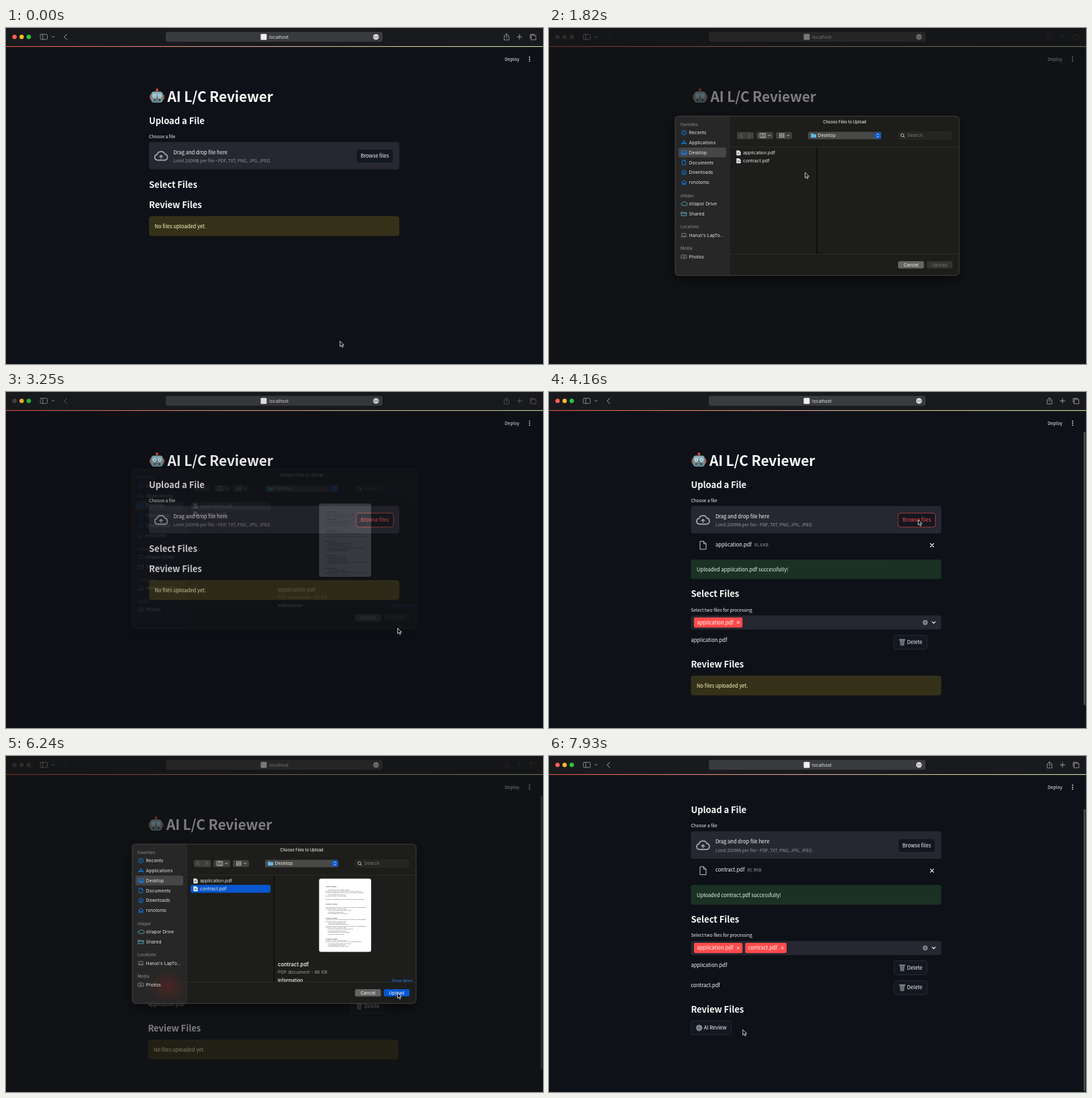
Animation of 800 by 500 pixels, one loop 8000 ms. Source, as an HTML page:

```html
<!DOCTYPE html>
<html lang="en">
<head>
<meta charset="utf-8">
<title>File review app</title>
<style>
html, body { margin: 0; width: 100%; height: 100%; overflow: hidden; background: #0e1117; }
svg { display: block; width: 100%; height: 100%; }
text { white-space: pre; }
.h1, .h2, .body, .small { font-family: "Noto Sans CJK JP", "Noto Sans CJK SC", "Noto Sans CJK", "Noto Sans", sans-serif; }
.h1 { font-size: 20.88px; font-weight: 700; letter-spacing: -.005em; }
.h2 { font-size: 13.1px; font-weight: 700; letter-spacing: -.005em; }
.body { font-size: 7.59px; }
.small { font-size: 6.64px; }
.dot { font-family: "Noto Sans", sans-serif; font-size: 5.9px; }
.ui, .tiny, .head, .name, .info { font-family: Inter, Roboto, sans-serif; }
.ui { font-size: 6.8px; }
.tiny { font-size: 5.85px; }
.head { font-size: 5.8px; font-weight: 600; }
.name { font-size: 7.7px; font-weight: 600; }
.info { font-size: 6.7px; font-weight: 600; }
.doc { font-family: "Liberation Sans", sans-serif; font-size: 2.05px; }
.mid { text-anchor: middle; }
</style>
</head>
<body>
<svg id="stage" viewBox="0 0 800 500" preserveAspectRatio="none"></svg>
<script>
const BG = '#0e1117', WHITE = '#fafafa', BLUE = '#0a84ff', TEAL = '#5fb6bd', GRAY = '#98989a', ACCENT = '#0757d0';

const text = (x, y, s, cls, fill = WHITE, extra = '') =>
  `<text x="${x}" y="${y}" class="${cls}" fill="${fill}" ${extra}>${s}</text>`;
const rect = (x, y, w, h, fill, r = 0, extra = '') =>
  `<rect x="${x}" y="${y}" width="${w}" height="${h}" rx="${r}" fill="${fill}" ${extra}/>`;
const circle = (x, y, r, fill, extra = '') =>
  `<circle cx="${x}" cy="${y}" r="${r}" fill="${fill}" ${extra}/>`;
const line = (d, color, w = 1, extra = '') =>
  `<path d="${d}" fill="none" stroke="${color}" stroke-width="${w}" stroke-linecap="round" stroke-linejoin="round" ${extra}/>`;
const group = (id, s, extra = '') => `<g id="${id}" ${extra}>${s}</g>`;
const cross = (x, y, r, color, w) =>
  line(`M${x - r} ${y - r}l${2 * r} ${2 * r}m0 ${-2 * r}l${-2 * r} ${2 * r}`, color, w);
const chevron = (x, y, r, color, w = 1) => line(`M${x - r} ${y - r / 2}l${r} ${r}l${r} ${-r}`, color, w);

// Page parts
const button = (x, y, w, id = '') =>
  rect(x, y, w, 20.8, '#131720', 4, `stroke="#363a43" stroke-width=".6" ${id && `id="${id}"`}`);
const panel = (y, h, fill) => rect(213, y, 373, h, fill, 4);

const robot = () =>
  line('M225 95v-3', '#8a6a50', 1.4) + circle(225, 92, 1.9, '#e8472f') +
  rect(214, 99, 22, 7.5, '#b4552e', 2) +
  rect(216, 94.5, 18, 16.5, '#6f929d', 4.5) + rect(217.5, 95.5, 15, 5, '#8fb0b8', 3) +
  circle(221, 101.3, 2.5, '#d7f3f6') + circle(229, 101.3, 2.5, '#d7f3f6') +
  circle(221, 101.3, 1.2, '#3c93ad') + circle(229, 101.3, 1.2, '#3c93ad') +
  `<path d="M225 102l1.4 2.8h-2.8z" fill="#d2502f"/>` +
  rect(219.8, 106, 10.4, 2.8, '#27363d', 1) +
  line('M222 107.4h6', '#d9e4e5', 1, 'stroke-dasharray="1 1.2" stroke-linecap="butt"');

const cloud = () =>
  line('M226.5 196.6h-.8a4.3 4.3 0 0 1-.6-8.5a6.2 6.2 0 0 1 11.6-.5a4.6 4.6 0 0 1 .3 9h-1.6', '#a3a8b4', 1.7) +
  line('M227 196.6h8', '#a3a8b4', 1.7) +
  line('M231 194v-4.4m-2.2 2l2.2-2.2l2.2 2.2', '#a3a8b4', 1.4);

const top_ = () =>
  robot() + text(240.5, 110, 'AI L/C Reviewer', 'h1') +
  text(213, 142.9, 'Upload a File', 'h2') + text(213, 163.6, 'Choose a file', 'small') +
  panel(169.5, 41, '#262730') + cloud() +
  text(249.5, 187.6, 'Drag and drop file here', 'body') +
  text(249.5, 200.4, 'Limit 200MB per file <tspan class="dot">•</tspan> PDF, TXT, PNG, JPG, JPEG', 'small', '#92939a') +
  button(521.6, 180.2, 55.6, 'browse') + text(549.4, 193.2, 'Browse files', 'body mid', WHITE, 'id="browseText"');

const warning = y => panel(y, 29.4, '#353119') + text(221.6, y + 18, 'No files uploaded yet.', 'body', '#ffffc2');
const headings = (a, b) => text(213, a, 'Select Files', 'h2') + text(213, b, 'Review Files', 'h2');

const trash = (x, y) =>
  `<path d="M${x - 4} ${y - 3.6}h8l-1.2 8.6h-5.6z" fill="#5c6166"/>` +
  rect(x - 4.7, y - 4.8, 9.4, 1.6, '#8b9095', .8) +
  line(`M${x - 1.8} ${y - 2}l.4 6m3.2-6l-.4 6`, '#9aa0a5', .5);
const gear = (x, y) =>
  circle(x, y, 4, 'none', 'stroke="#a9b0b6" stroke-width="1.6" stroke-dasharray="1.5 1"') +
  circle(x, y, 2.8, '#3a4048', 'stroke="#8f979e" stroke-width="1.5"') + circle(x, y, 1, '#a9b0b6');

const tag = (x, w, name) =>
  rect(x, 335.4, w, 15.2, '#ff4b4b', 2) + text(x + 4.6, 345.8, name, 'body') + cross(x + w - 6.3, 343, 1.6, WHITE, .9);
const fileRow = (y, name) =>
  text(213, y, name, 'body') + button(515.6, y - 9.5, 49.2) + trash(527.8, y + 1) + text(535.2, y + 3.6, 'Delete', 'body');

const uploaded = (name, size, sizeX) =>
  line('M227 222.2h5l3.6 3.6v8.2h-8.6zM232 222.2v3.6h3.6', '#c4c6cc', 1) +
  text(249.6, 229.8, name, 'body') + text(sizeX, 229.8, size, 'small', '#92939a') +
  cross(572.2, 228, 2.5, WHITE, 1.1) +
  panel(249.2, 29.4, '#1a3123') + text(221.6, 267.2, `Uploaded ${name} successfully!`, 'body', '#dffde9') +
  text(213, 326.6, 'Select two files for processing', 'small') +
  panel(332.6, 21, '#262730') + tag(217.6, 72.2, 'application.pdf') +
  circle(562.1, 343, 3.7, '#85868c') + cross(562.1, 343, 1.2, '#262730', .8) + chevron(574.8, 343, 2.3, WHITE, 1.2) +
  fileRow(371.6, 'application.pdf');

const page =
  top_() +
  group('empty', headings(237.8, 268.1) + warning(280)) +
  group('one', uploaded('application.pdf', '91.6KB', 307) + headings(305.3, 409.8) + warning(422)) +
  group('two', uploaded('contract.pdf', '85.9KB', 296.8) + tag(293.8, 61.8, 'contract.pdf') +
    fileRow(401.3, 'contract.pdf') + headings(305.3, 439.4) +
    button(213.2, 451.4, 59.8) + gear(225.3, 462) + text(232.4, 464.6, 'AI Review', 'body'));

// Browser chrome
const lights = ['#ff5f57', '#febc2e', '#28c840'];
const chrome =
  rect(0, 28, 800, 32, BG) +
  text(743, 48.8, 'Deploy', 'small') + [43.3, 46.3, 49.3].map(y => circle(780, y, .9, WHITE)).join('') +
  rect(796.6, 59, 2.6, 400, '#4d4f55', 1.3, 'id="thumb"') +
  rect(0, 0, 800, 27, '#191a1d') + rect(0, 27, 800, 1.1, 'url(#bar)') +
  lights.map((c, i) => circle(12.7 + i * 10.6, 13.3, 3.2, c, 'class="light"')).join('') +
  line('M52.3 9.4h8a1.2 1.2 0 0 1 1.2 1.2v5.2a1.2 1.2 0 0 1-1.2 1.2h-8a1.2 1.2 0 0 1-1.2-1.2v-5.2a1.2 1.2 0 0 1 1.2-1.2zM54.8 9.4v7.6', '#9c9da0', .8) +
  chevron(70.3, 13.2, 1.6, '#9c9da0', 1) +
  rect(238, 5.8, 323, 14.8, '#3a3b3e', 3.5) + rect(379.4, 8.8, 9, 9, '#f0f0f0', 1.5) +
  text(392, 15.7, 'localhost', 'ui', '#e4e4e5') +
  circle(551.2, 13.3, 4.3, '#d6d6d8') + [549, 551.2, 553.4].map(x => circle(x, 13.3, .65, '#3a3b3e')).join('') +
  group('tools',
    line('M90.6 9.4l-4 3.9l4 3.9', '#a9aaad', 1) +
    line('M743.6 11.8h-1.4v6h7v-6h-1.4M745.7 14.6v-6m-2 1.8l2-2l2 2', '#a9aaad', .8) +
    line('M761.5 13.2h7m-3.5-3.5v7', '#a9aaad', .9) +
    line('M782.7 11h6.6v6.6h-6.6zM781 15.6v-6.2h6.4', '#a9aaad', .8));

// Upload dialog
const icons = {
  clock: y => circle(201, y, 3.4, 'none', `stroke="${BLUE}" stroke-width=".8"`) + line(`M201 ${y - 2}v2h-1.6`, BLUE, .7),
  apps: y => line(`M198 ${y + 2.8}l3-5.8l3 5.8M197.6 ${y + 1}h2m3 0h2M200.2 ${y + 1}h1.6`, BLUE, 1),
  desk: y => rect(197.2, y - 2.8, 7.8, 5.6, 'none', 1, `stroke="${BLUE}" stroke-width=".9"`) + rect(198, y + .6, 6.2, 1.6, BLUE),
  doc: y => line(`M198.6 ${y - 3.5}h3l2 2v5h-5zM201.6 ${y - 3.5}v2h2`, BLUE, .8),
  down: y => circle(201, y, 3.4, 'none', `stroke="${BLUE}" stroke-width=".8"`) + line(`M201 ${y - 1.7}v3.2m-1.4-1.3l1.4 1.4l1.4-1.4`, BLUE, .7),
  home: y => line(`M197.4 ${y}l3.6-3.2l3.6 3.2M198.5 ${y}v3.2h1.6v-2h1.8v2h1.6v-3.2`, BLUE, .9),
  cloud: y => line(`M199 ${y + 2.5}a1.9 1.9 0 0 1 0-3.8a2.7 2.7 0 0 1 5-.4a2.1 2.1 0 0 1 .2 4.2z`, TEAL, .8),
  share: y => line(`M197.3 ${y - 2.5}h2.6l.8.9h4.2v4.4h-7.6zM197.3 ${y - .5}h7.6`, TEAL, .8),
  laptop: y => line(`M198.2 ${y - 2.5}h5.6v4h-5.6zM196.9 ${y + 2.6}h8.2`, GRAY, .7),
  camera: y => line(`M197.2 ${y - 1.9}h2l.7-1h2.2l.7 1h2v4.7h-7.6z`, GRAY, .7) + circle(201, y + .4, 1.3, 'none', `stroke="${GRAY}" stroke-width=".7"`)
};
const places = [
  [155.7, 'clock', 'Recents'], [170.5, 'apps', 'Applications'], [185.3, 'desk', 'Desktop'],
  [200.1, 'doc', 'Documents'], [215, 'down', 'Downloads'], [229.8, 'home', 'rvnolomo'],
  [261.6, 'cloud', 'oVapor Drive'], [276.4, 'share', 'Shared'],
  [308.3, 'laptop', 'Haruo\'s LapTo...'], [340.1, 'camera', 'Photos']
];
const sections = [[145.8, 'Favorites'], [252, 'oVapor'], [298.4, 'Locations'], [330.3, 'Media']];

const files = ['application.pdf', 'contract.pdf'];
const sizes = ['92 KB', '86 KB'];
const phrases = [
  'This agreement sets out the terms for the supply of goods between',
  'the parties named above and is valid from the date of signature',
  'Goods are packed and shipped under the terms listed here',
  'Payment by letter of credit at sight'
];
const plans = ['# pp #--pp  #pp p  #---p--  #p--pp  #--p-', '# -pp-p p  # pp---  #pp--pp----  #pp---'];
const preview = i => group('preview' + i,
  rect(466.4, 182.4, 77.6, 109, '#fff', 3) +
  [...plans[i]].map((c, n) => {
    const y = +(195 + n * 2.35).toFixed(2), s = phrases[(n * 3 + i) % 4];
    return c === '#' ? text(476, y, `${n ? 1 + n / 9 | 0 : ''} Terms of Supply`, 'doc', '#111', 'font-weight="700"')
      : c === 'p' ? text(476, y, s, 'doc', '#333')
      : c === '-' ? text(479, y, '• ' + s.slice(0, 24 + n * 7 % 16), 'doc', '#222') : '';
  }).join('') +
  text(405, 313.2, files[i], 'name', '#e4e4e2') +
  text(405, 324, `PDF document - ${sizes[i]}`, 'ui', '#9b9b99') +
  `<g clip-path="url(#fold)">${text(405, 336.4, 'Information', 'info', '#e4e4e2')}${text(574.5, 336.6, 'Show More', 'tiny', '#2b80ee')}</g>`);

const fileItem = i => {
  const y = 185.8 + i * 11.8;
  return rect(275, y - 5.8, 119, 11.6, ACCENT, 2.5, `id="sel${i}"`) +
    `<path d="M279.3 ${y - 3.6}h4l2.3 2.3v5h-6.3z" fill="#f4f4f4"/>` +
    rect(280.7, y - .6, 3.4, 2.4, '#8d9094') +
    text(289, y + 2.4, files[i], 'ui', '#e8e8e6');
};
const tool = (x, w) => rect(x, 154.8, w, 10.4, '#40403e', 2.5);

const dialog =
  rect(188, 131.2, 423, 237, '#1d1d1b', 5, 'style="filter:drop-shadow(0 6px 10px rgba(0,0,0,.5))"') +
  `<path d="M270 131.2v237h-77a5 5 0 0 1-5-5v-227a5 5 0 0 1 5-5z" fill="#262726"/>` +
  `<ellipse id="tint" cx="241" cy="343" rx="29" ry="24" fill="url(#glow)"/>` +
  line('M270 177.4H611M270 336.6H611', '#30302e', .7) + line('M399.3 178V336', '#070707', 1.2) +
  rect(188, 131.2, 423, 237, 'none', 5, 'stroke="#555654" stroke-width=".7"') +
  rect(193, 178, 71, 14.6, '#454645', 3) +
  sections.map(([y, s]) => text(196, y, s, 'head', '#777876')).join('') +
  places.map(([y, icon, s]) => icons[icon](y) + text(208.6, y + 2.4, s, 'ui', '#e6e6e4')).join('') +
  text(440.5, 142.1, 'Choose Files to Upload', 'tiny mid', '#e2e2e0', 'font-weight="500"') +
  tool(280, 25) + line('M292.5 156v8', '#2a2a28', .6) +
  line('M287.4 157.5l-2.4 2.5l2.4 2.5M297.8 157.5l2.4 2.5l-2.4 2.5', '#777775', .9) +
  tool(309.4, 24.6) + line('M314.6 157h8v6h-8zM317.3 157v6m2.7-6v6', '#dededc', .7) + chevron(328.3, 160, 1.6, '#dededc', .9) +
  tool(338, 24) + [0, 1, 2].map(c => [0, 1, 2].map(r => rect(343 + c * 2.8, 156.8 + r * 2.4, 2, 1.5, '#c8c8c6')).join('')).join('') +
  chevron(356.3, 160, 1.6, '#dededc', .9) +
  rect(386, 154.6, 109, 10.8, '#4a4a48', 2.5) + rect(485.4, 155.4, 9, 9.2, ACCENT, 2) +
  line('M488.4 159l1.5-1.6l1.5 1.6M488.4 161l1.5 1.6l1.5-1.6', '#fff', .8) +
  `<path d="M390.3 157h2.8l.9 1h4v5h-7.7z" fill="#5fb9ea"/>` + text(400.5, 162.4, 'Desktop', 'ui', '#ececea') +
  rect(520, 154.8, 80, 10.6, '#242422', 2.5, 'stroke="#353533" stroke-width=".5"') +
  circle(526.4, 159.5, 2.2, 'none', 'stroke="#dcdcda" stroke-width=".8"') + line('M528.1 161.2l1.7 1.8', '#dcdcda', .9) +
  text(533.6, 162.4, 'Search', 'ui', '#7d7d7b') +
  fileItem(0) + fileItem(1) + preview(0) + preview(1) +
  rect(520, 347, 38.6, 10.7, '#656563', 2.5) + text(539.3, 354.8, 'Cancel', 'ui mid', '#f2f2f0') +
  rect(562.8, 347, 38.4, 10.7, '#333331', 2.5, 'id="ok"') + text(581.8, 354.8, 'Upload', 'ui mid', '#727270', 'id="okText"');

document.getElementById('stage').innerHTML =
  `<defs>
    <linearGradient id="bar"><stop stop-color="#e0504a"/><stop offset=".45" stop-color="#d9a58a"/><stop offset="1" stop-color="#cfe0a4"/></linearGradient>
    <radialGradient id="glow"><stop stop-color="#5a2422" stop-opacity=".7"/><stop offset="1" stop-color="#5a2422" stop-opacity="0"/></radialGradient>
    <clipPath id="fold"><rect x="400" y="325" width="211" height="11.2"/></clipPath>
  </defs>` +
  rect(0, 0, 800, 500, BG) + group('page', page) + chrome +
  rect(0, 0, 800, 500, '#131313', 0, 'id="dim"') + group('dialog', dialog) +
  group('cursor', '<path d="M0 0v8l1.9-1.7l1.3 2.9l1.4-.6l-1.3-2.9h2.5z" fill="#0a0a0a" stroke="#f4f4f4" stroke-width=".8" stroke-linejoin="round"/>');

// Motion
const LOOP = 8000, STEP = 130;
const path = [
  [260, 497.6, 466], [910, 549, 191], [1430, 549, 191], [1820, 381.5, 215], [2080, 322, 186], [2340, 322, 186],
  [2860, 583.5, 351.5], [3380, 583.5, 351.5], [4030, 550, 190], [4550, 550, 190], [5070, 321.3, 198],
  [5330, 321.3, 198], [5850, 583.3, 352.5], [6760, 583.3, 352.5], [7280, 406.6, 371.3], [7540, 406.6, 371.3], [7930, 288.8, 407.3]
];
const clamp = v => Math.max(0, Math.min(1, v));
const ease = v => v * v * (3 - 2 * v);
const mix = (a, b, k) => a + (b - a) * k;
const $ = id => document.getElementById(id);
const set = (el, attrs) => { for (const k in attrs) el.setAttribute(k, attrs[k]); };
const show = (id, on) => set($(id), { display: on ? 'inline' : 'none' });
const between = (t, a, b) => t >= a && t < b;
const fade = (t, a, b) => Math.min(clamp((t - a) / 390), clamp((b - t) / 390));
const lightEls = [...document.querySelectorAll('.light')];

function cursorAt(t) {
  const i = path.findIndex(p => p[0] > t);
  if (i < 1) return i ? path[path.length - 1].slice(1) : path[0].slice(1);
  const [t0, x0, y0] = path[i - 1], [t1, x1, y1] = path[i];
  const k = ease((t - t0) / (t1 - t0));
  return [mix(x0, x1, k), mix(y0, y1, k)];
}

function draw(time) {
  const t = Math.floor(time / STEP) * STEP;
  const stage = t < 3510 ? 0 : t < 6890 ? 1 : 2;
  ['empty', 'one', 'two'].forEach((id, i) => show(id, i === stage));

  const slide = ease(clamp((t - 7410) / 390));
  const scroll = stage === 2 ? mix(1, 57.4, slide) : 0;
  set($('page'), { transform: `translate(${stage ? -1.6 : 0} ${-scroll})` });
  show('thumb', stage > 0);
  const y0 = mix(59, 79, slide), y1 = stage === 2 ? mix(449, 499, slide) : 466;
  set($('thumb'), { y: y0, height: y1 - y0 });

  const hot = between(t, 780, 3510) || between(t, 4030, 6890);
  set($('browse'), { stroke: hot ? '#ff4b4b' : '#363a43' });
  set($('browseText'), { fill: hot ? '#ff4b4b' : WHITE });

  const second = t > 4000;
  const a = second ? fade(t, 4290, 6695) : fade(t, 1040, 3315);
  set($('dim'), { opacity: a * .54 });
  set($('dialog'), { opacity: a, transform: `translate(0 ${-19.6 * (1 - a)})` });
  show('dialog', a > 0);
  set($('tools'), { opacity: a > .3 ? .2 : a > 0 ? .5 : 1 });
  lightEls.forEach((el, i) => set(el, { fill: a > (i ? .3 : 0) ? '#454547' : lights[i] }));

  const picked = second ? (t >= 5330 ? 1 : -1) : (t >= 2210 ? 0 : -1);
  [0, 1].forEach(i => { show('sel' + i, picked === i); show('preview' + i, picked === i); });
  show('tint', second);
  const ready = picked >= 0 && a === 1;
  set($('ok'), { fill: ready ? ACCENT : '#333331' });
  set($('okText'), { fill: ready ? '#fff' : '#727270' });
  [0, 1].forEach(i => set($('sel' + i), { fill: a === 1 ? ACCENT : '#4a4a48' }));

  set($('cursor'), { transform: `translate(${cursorAt(t)})` });
}

const start = performance.now();
function tick() {
  draw((performance.now() - start) % LOOP);
  requestAnimationFrame(tick);
}
tick();
</script>
</body>
</html>
```
